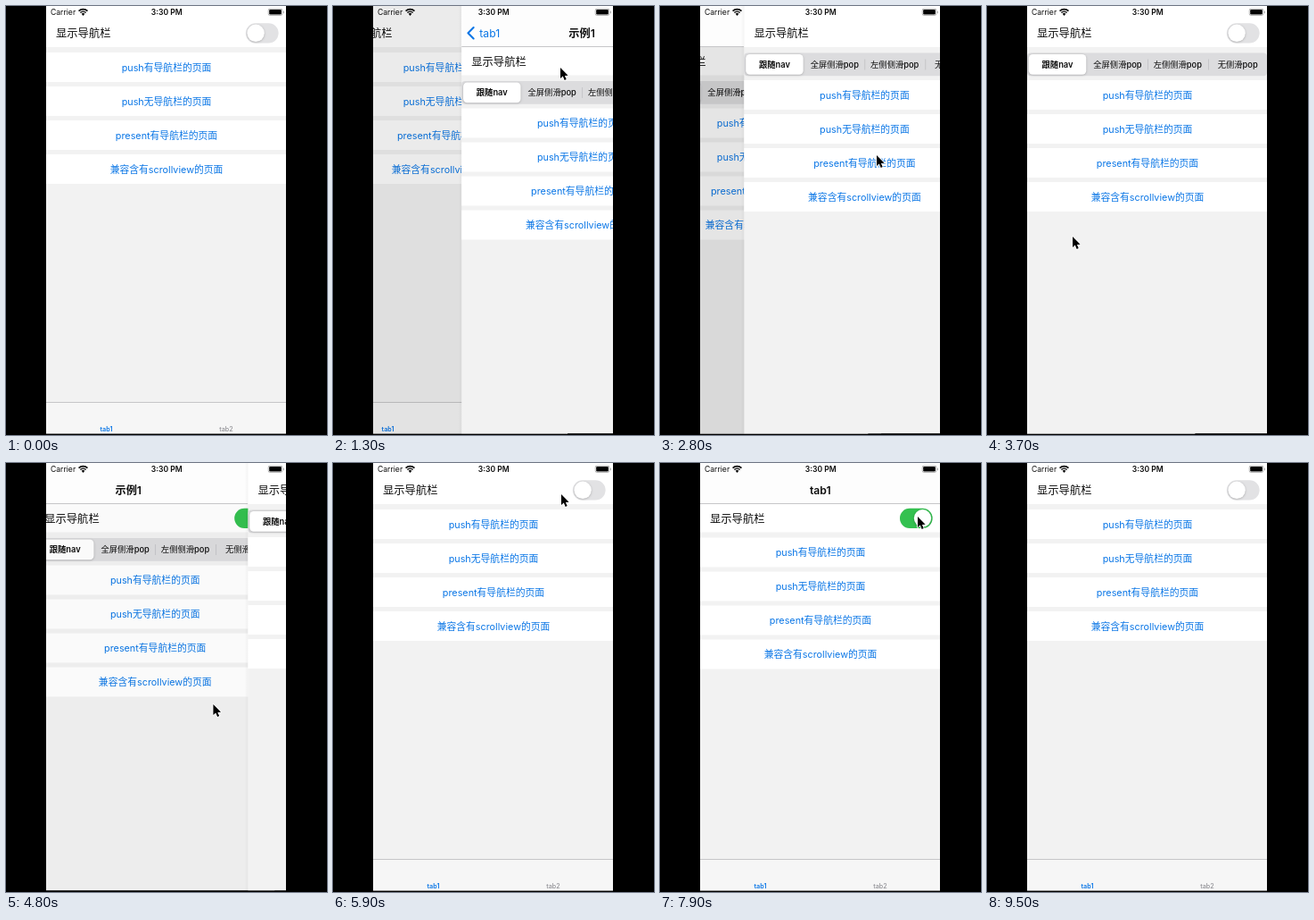
An HTML page with a canvas that plays this animation: 360x480 px, repeating every 9600 ms.

```html
<!DOCTYPE html>
<html lang="zh">
<head>
<meta charset="utf-8">
<style>
html, body { margin: 0; width: 100%; height: 100%; overflow: hidden; background: #000; }
canvas { display: block; width: 360px; height: 480px; }
</style>
</head>
<body>
<canvas id="stage"></canvas>
<script>
const LOOP = 9600, LEFT = 45, W = 269, H = 478.4, BAR = 31.5;
const BLUE = '#0a76e6', INK = '#0c0c0c', LINE = '#c6c6c8';
const ROWS = ['push有导航栏的页面', 'push无导航栏的页面', 'present有导航栏的页面', '兼容含有scrollview的页面'];
const MODES = ['跟随nav', '全屏侧滑pop', '左侧侧滑pop', '无侧滑pop'];
const POINTER = [
  [480, 318, 108], [900, 255, 69], [2100, 255, 69], [2450, 243, 167], [3050, 243, 167],
  [3450, 132, 290], [3700, 96, 258], [4000, 92, 266], [4200, 94, 268], [4650, 240, 272],
  [4950, 225, 268], [5200, 95, 240], [5550, 241, 205], [5850, 256, 35], [6100, 256, 35],
  [6350, 288, 28], [6600, 288, 28], [6950, 289, 62], [7800, 289, 60], [8200, 289, 60],
  [8650, 322, 4]
];

const canvas = document.getElementById('stage');
const c = canvas.getContext('2d');
const ratio = window.devicePixelRatio || 1;
canvas.width = 360 * ratio;
canvas.height = 480 * ratio;

const clamp = v => Math.max(0, Math.min(1, v));
const smooth = v => v * v * (3 - 2 * v);
const ramp = (t, from, span) => smooth(clamp((t - from) / span));
const spring = ms => ms <= 0 ? 0 : 1 - Math.exp(-ms * .014) * (1 + ms * .014);

function track(keys, t) {
  const i = keys.findIndex(k => k[0] > t);
  if (i < 0) return keys[keys.length - 1].slice(1);
  if (i === 0) return keys[0].slice(1);
  const a = keys[i - 1], b = keys[i];
  const p = smooth((t - a[0]) / (b[0] - a[0]));
  return a.slice(1).map((v, n) => v + (b[n + 1] - v) * p);
}

function rect(x, y, w, h, color) {
  c.fillStyle = color;
  c.fillRect(x, y, w, h);
}

function round(x, y, w, h, r, color) {
  c.fillStyle = color;
  c.beginPath();
  c.roundRect(x, y, w, h, r);
  c.fill();
}

function raised(x, y, w, h, r) {
  c.save();
  c.shadowColor = 'rgba(0,0,0,.25)';
  c.shadowBlur = 2.5 * ratio;
  c.shadowOffsetY = .6 * ratio;
  round(x, y, w, h, r, '#fff');
  c.restore();
}

// y is the visual middle of the line
function text(s, x, y, size, color = INK, weight = 400, align = 'center') {
  c.font = `${weight} ${size}px Inter, "Noto Sans CJK SC", "Noto Sans CJK", sans-serif`;
  c.textAlign = align;
  c.fillStyle = color;
  c.fillText(s, x, y + size * .37);
}

function toggle(x, y, on) {
  round(x, y, 36.6, 22.2, 11.1, '#e2e2e4');
  c.globalAlpha = on;
  round(x, y, 36.6, 22.2, 11.1, '#34c150');
  c.globalAlpha = 1;
  raised(x + 1.4 + on * 14.4, y + 1.4, 19.4, 19.4, 9.7);
}

function segments(x, y) {
  round(x, y, W, 25.7, 4, '#dcdcde');
  raised(x + 1.8, y + 1.5, 64.5, 22.7, 4.5);
  for (const d of [135, 203]) rect(x + d, y + 7, .8, 12, '#c0c0c4');
  MODES.forEach((m, i) => text(m, x + 34 + i * 67.4, y + 13, 9.3, INK, i ? 500 : 600));
}

function content(x, dy, { seg, tabs, on = 0, pressed = -1, alpha = 1 }) {
  rect(x, 0, W, H, '#f2f2f2');
  rect(x, 0, W, 46 + dy, '#fff');
  text('显示导航栏', x + 11, 30.7 + dy, 12.3, INK, 400, 'left');
  toggle(x + 224, 19.2 + dy, on);
  if (seg) segments(x, 52.5 + dy);
  ROWS.forEach((label, i) => {
    const y = 52 + dy + (seg ? 31 : 0) + i * 38;
    rect(x, y, W, 33, '#fff');
    c.globalAlpha = i === pressed ? alpha : 1;
    text(label, x + W / 2 + .5, y + 17, 10.8, BLUE);
    c.globalAlpha = 1;
  });
  if (tabs) {
    rect(x, 443, W, 36, '#f6f6f6');
    rect(x, 443, W, 1, LINE);
    text('tab1', x + 67.5, 473.3, 7.2, BLUE, 600);
    text('tab2', x + 202, 473.3, 7.2, '#8e8e93', 500);
  }
}

function navBar(x, y, title, back) {
  rect(x, 0, W, 45 + y, '#fdfdfd');
  rect(x, 45 + y, W, 1, LINE);
  text(title, x + W / 2 + .3, 30 + y, 12.2, INK, 600);
  if (!back) return;
  c.strokeStyle = BLUE;
  c.lineWidth = 2.1;
  c.lineCap = c.lineJoin = 'round';
  c.beginPath();
  c.moveTo(x + 13.4, 24);
  c.lineTo(x + 7.2, 30.2);
  c.lineTo(x + 13.4, 36.4);
  c.stroke();
  text(back, x + 20, 30, 12.2, BLUE, 400, 'left');
}

function dim(p) {
  rect(LEFT, 0, W, H, `rgba(0,0,0,${.125 * p})`);
}

function edge(x, p) {
  if (p <= 0 || p >= .995) return;
  const g = c.createLinearGradient(x - 4, 0, x, 0);
  g.addColorStop(0, 'rgba(0,0,0,0)');
  g.addColorStop(1, 'rgba(0,0,0,.035)');
  rect(x - 4, 0, 4, H, g);
}

function statusBar() {
  text('Carrier', 50, 7.2, 8.6, INK, 400, 'left');
  text('3:30 PM', 180.3, 7.2, 8.6, INK, 600);
  c.strokeStyle = INK;
  c.lineCap = 'butt';
  c.lineWidth = 1.6;
  for (const r of [4.4, 7]) {
    c.beginPath();
    c.arc(86.5, 10.6, r, -Math.PI * .75, -Math.PI * .25);
    c.stroke();
  }
  c.fillStyle = INK;
  c.beginPath();
  c.moveTo(86.5, 11);
  c.arc(86.5, 10.6, 2.6, -Math.PI * .75, -Math.PI * .25);
  c.fill();
  round(293.8, 2.8, 16.4, 8, 2.4, '#a2a2a2');
  round(294.5, 3.5, 15, 6.6, 1.8, '#fff');
  round(295.2, 4, 13.6, 5.6, 1.3, '#000');
  round(310.8, 5.4, 1, 2.8, .5, '#a2a2a2');
}

function pointer(x, y) {
  c.save();
  c.translate(x, y);
  c.beginPath();
  [[0, 0], [0, 12], [2.8, 9.6], [4.7, 14], [6.7, 13.1], [4.9, 8.9], [8.6, 8.7]]
    .forEach(([px, py]) => c.lineTo(px, py));
  c.closePath();
  c.lineJoin = 'round';
  c.lineWidth = 1.6;
  c.strokeStyle = '#fff';
  c.stroke();
  c.fillStyle = '#000';
  c.fill();
  c.restore();
}

function draw(t) {
  // share of the screen taken by the second and third page
  const second = t < 5200 ? spring(t - 1148)
    : 1 - track([[5200, 0], [5550, 146], [5800, W]], t)[0] / W;
  const third = t < 4200 ? spring(t - 2579)
    : 1 - track([[4200, 0], [4650, 146], [4900, W]], t)[0] / W;
  const on = ramp(t, 6450, 250) - ramp(t, 8050, 250);
  const bar = ramp(t, 6480, 220) - ramp(t, 8080, 220);
  const press = (from, to) => t < from ? 1 : .2 + .8 * ramp(t, to, 140);

  c.setTransform(ratio, 0, 0, ratio, 0, 0);
  rect(0, 0, 360, 480, '#000');
  c.save();
  c.beginPath();
  c.rect(LEFT, 0, W, H);
  c.clip();

  if (second < 1) {
    const x = LEFT - .3 * W * second;
    content(x, BAR * bar, { tabs: true, on, pressed: 0, alpha: press(1060, 1130) });
    if (bar > 0) navBar(x, BAR * (bar - 1), 'tab1');
    dim(second);
  }
  if (second > 0) {
    const x = LEFT + W * (1 - second);
    edge(x, second);
    content(x - .3 * W * third, BAR, { seg: true, on: 1, pressed: 1, alpha: press(2510, 2620) });
    dim(third);
    if (third < 1) navBar(x - W * third, 0, '示例1', 'tab1');
  }
  if (third > 0) {
    const x = LEFT + W * (1 - third);
    edge(x, third);
    content(x, 0, { seg: true });
  }
  statusBar();
  if (t > 480 && t < 8650) pointer(...track(POINTER, t));
  c.restore();
}

const start = performance.now();
function frame() {
  draw((performance.now() - start) % LOOP);
  requestAnimationFrame(frame);
}
frame();
</script>
</body>
</html>
```
